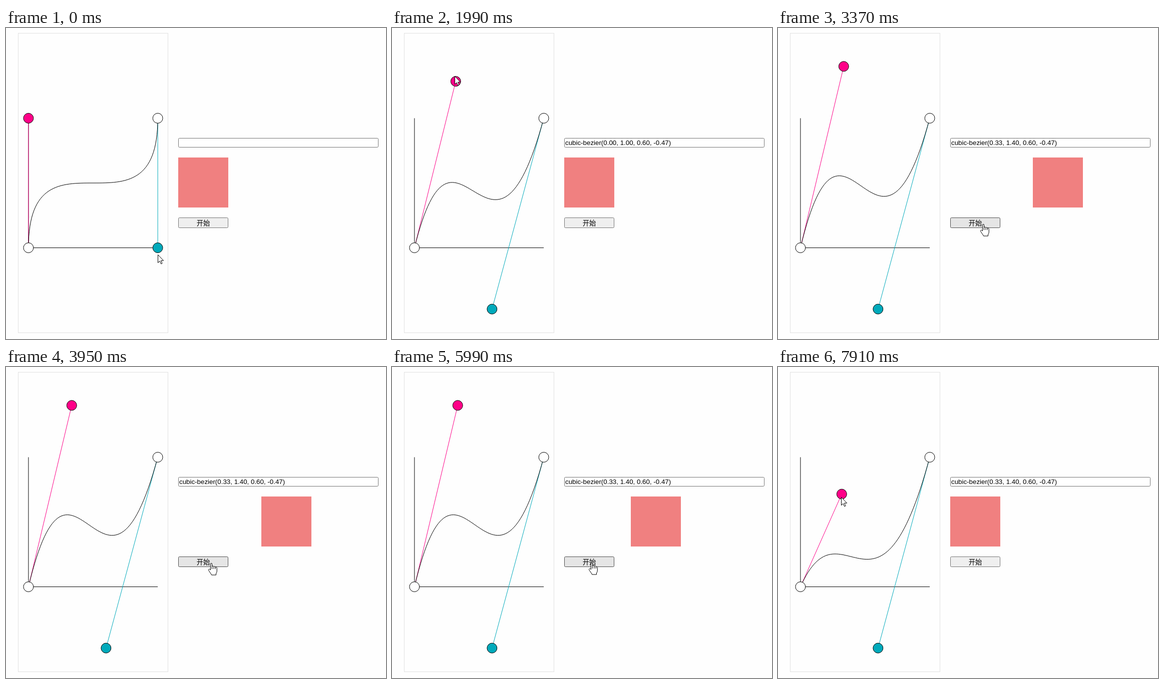
An HTML page for the animation above (8000 ms loop, 759x622 px).

```html
<!DOCTYPE html>
<html lang="zh">
<head>
<meta charset="utf-8">
<title>Bezier editor</title>
<style>
html, body { margin: 0; width: 100%; height: 100%; overflow: hidden; background: #fefefe; }
svg { display: block; }
text { font: 13.333px "Liberation Sans", Arial, "Noto Sans CJK SC", "Noto Sans CJK", sans-serif; fill: #000; }
.line { fill: none; stroke: #000; }
.knob { stroke: #000; }
</style>
</head>
<body>
<svg width="759" height="622" viewBox="0 0 759 622">
  <rect x="24.5" y="10.5" width="299" height="599" fill="none" stroke="#e1e1e1"/>
  <!-- 300 x 600 plot squeezed inside the border -->
  <g transform="translate(25 11) scale(.99333 .99667)">
    <path class="line" d="M20 170V430H280"/>
    <path id="armA" class="line" style="stroke:#f08"/>
    <path id="armB" class="line" style="stroke:#0ab"/>
    <path id="curve" class="line"/>
    <circle class="knob" cx="20" cy="430" r="10" fill="#fff"/>
    <circle class="knob" cx="280" cy="170" r="10" fill="#fff"/>
    <circle id="knobA" class="knob" r="10" fill="#f08"/>
    <circle id="knobB" class="knob" r="10" fill="#0ab"/>
  </g>
  <rect x="344.5" y="220.5" width="399" height="18" rx="2" fill="#fff" stroke="#767676"/>
  <text id="value" x="346" y="234"></text>
  <rect id="box" y="259" width="100" height="100" fill="#f08080"/>
  <rect id="button" x="344.5" y="379.5" width="99" height="20" rx="2"/>
  <text x="394" y="395" text-anchor="middle">开始</text>
  <g id="cursor" fill="#fff" stroke="#000" stroke-linejoin="round">
    <path id="arrow" d="M.5 .5V16.5L4.1 13.2 6.7 18.8 9 17.8 6.6 12.2H11.6Z"/>
    <path id="hand" d="M-1.5 14V2Q-1.5 .5 0 .5T1.5 2V7Q1.7 5.8 3.2 6T5 7.7Q5.4 6.6 6.7 6.9T8.3 8.6Q9 7.6 10.2 8.3T11.3 10.5V16Q11.3 19 9.5 21V24H.5Q0 22-1.8 20L-5.2 14.8Q-6 13-4.7 12.3T-2.2 13.2ZM1.5 7V12M5 7.7V12M8.3 8.6V12"/>
  </g>
</svg>
<script>
const LOOP = 8000, FIRST = 200, STEP = 137.5;
const SIDE = 260, START = [20, 430], END = [280, 170];
const SLIDE = 960, clicks = [3111, 5699], drops = [1250, 2350];

// Stops: arrive, leave, x, y
const pink = [[0, 1710, 20, 170], [1987, 1987, 103, 96], [2270, 7470, 107, 66], [7900, LOOP, 103, 244]];
const teal = [[0, 340, 280, 430], [1150, LOOP, 176, 553]];
const pointer = [
  [0, 190, 303, 453], [1150, 1290, 200, 564], [1680, 1710, 45, 183],
  [1987, 1987, 125, 96], [2270, 2410, 128, 74], [2820, 2820, 405, 424],
  [3080, 4740, 410, 391.5], [4875, 6410, 398.5, 390.5],
  [7390, 7390, 125, 71], [7470, 7470, 130, 83], [7900, LOOP, 126, 260]
];

const $ = id => document.getElementById(id);
const set = (id, attrs) => {
  for (const k in attrs) $(id).setAttribute(k, attrs[k]);
};
const ramp = (t, a, b) => Math.min(1, Math.max(0, (t - a) / (b - a)));

// The picture refreshes at a fixed rate
const snap = t => Math.max(0, FIRST + STEP * Math.floor((t - FIRST) / STEP));

function at(stops, t) {
  const i = stops.findLastIndex(s => s[0] <= t);
  const [, leave, x, y] = stops[i];
  const [arrive, , nx, ny] = stops[i + 1] || [LOOP + 1, 0, x, y];
  const u = ramp(t, leave, arrive);
  const e = (u + u * u * (3 - 2 * u)) / 2;
  return [x + (nx - x) * e, y + (ny - y) * e];
}

const cubic = (a, b, s) => 3 * a * s * (1 - s) ** 2 + 3 * b * s * s * (1 - s) + s ** 3;

// cubic-bezier(0.33, 1.40, 0.60, -0.47)
function ease(p) {
  let lo = 0, hi = 1;
  for (let i = 0; i < 30; i++) {
    const mid = (lo + hi) / 2;
    if (cubic(0.33, 0.6, mid) < p) lo = mid; else hi = mid;
  }
  return cubic(1.4, -0.47, lo);
}

// The text holds the knob positions of the last drop
function label(t) {
  const drop = drops.filter(d => d <= t).pop();
  if (!drop) return "";
  const nums = [at(pink, drop), at(teal, drop)].flatMap(([x, y]) =>
    [(x - START[0]) / SIDE, (START[1] - y) / SIDE]);
  return `cubic-bezier(${nums.map(n => n.toFixed(2)).join(", ")})`;
}

function draw(t) {
  const a = at(pink, t), b = at(teal, t);
  set("armA", { d: `M${START}L${a}` });
  set("armB", { d: `M${END}L${b}` });
  set("curve", { d: `M${START}C${a} ${b} ${END}` });
  set("knobA", { cx: a[0], cy: a[1] });
  set("knobB", { cx: b[0], cy: b[1] });
  $("value").textContent = label(t);

  const [there, back] = clicks.map(c => ease(ramp(t, c, c + SLIDE)));
  set("box", { x: Math.round(344 + 300 * (there - back)) });

  // The pointer briefly dips off the button before the second click
  let [x, y] = at(pointer, t);
  y += 19 * Math.sin(Math.PI * ramp(t, 4880, 5560));
  const hover = x > 344 && x < 444 && y > 379 && y < 400;
  const pressed = hover && clicks.some(c => t > c - 40 && t < c + 100);
  const [fill, stroke] = pressed ? ["#f5f5f5", "#8d8d8d"]
    : hover ? ["#e5e5e5", "#4f4f4f"] : ["#efefef", "#767676"];
  set("button", { fill, stroke });
  set("cursor", { transform: `translate(${Math.round(x)} ${Math.round(y)})` });
  set("arrow", { visibility: hover ? "hidden" : "visible" });
  set("hand", { visibility: hover ? "visible" : "hidden" });
}

const begin = performance.now();
function tick(now) {
  draw(snap(Math.max(0, now - begin) % LOOP));
  requestAnimationFrame(tick);
}
draw(0);
requestAnimationFrame(tick);
</script>
</body>
</html>
```
